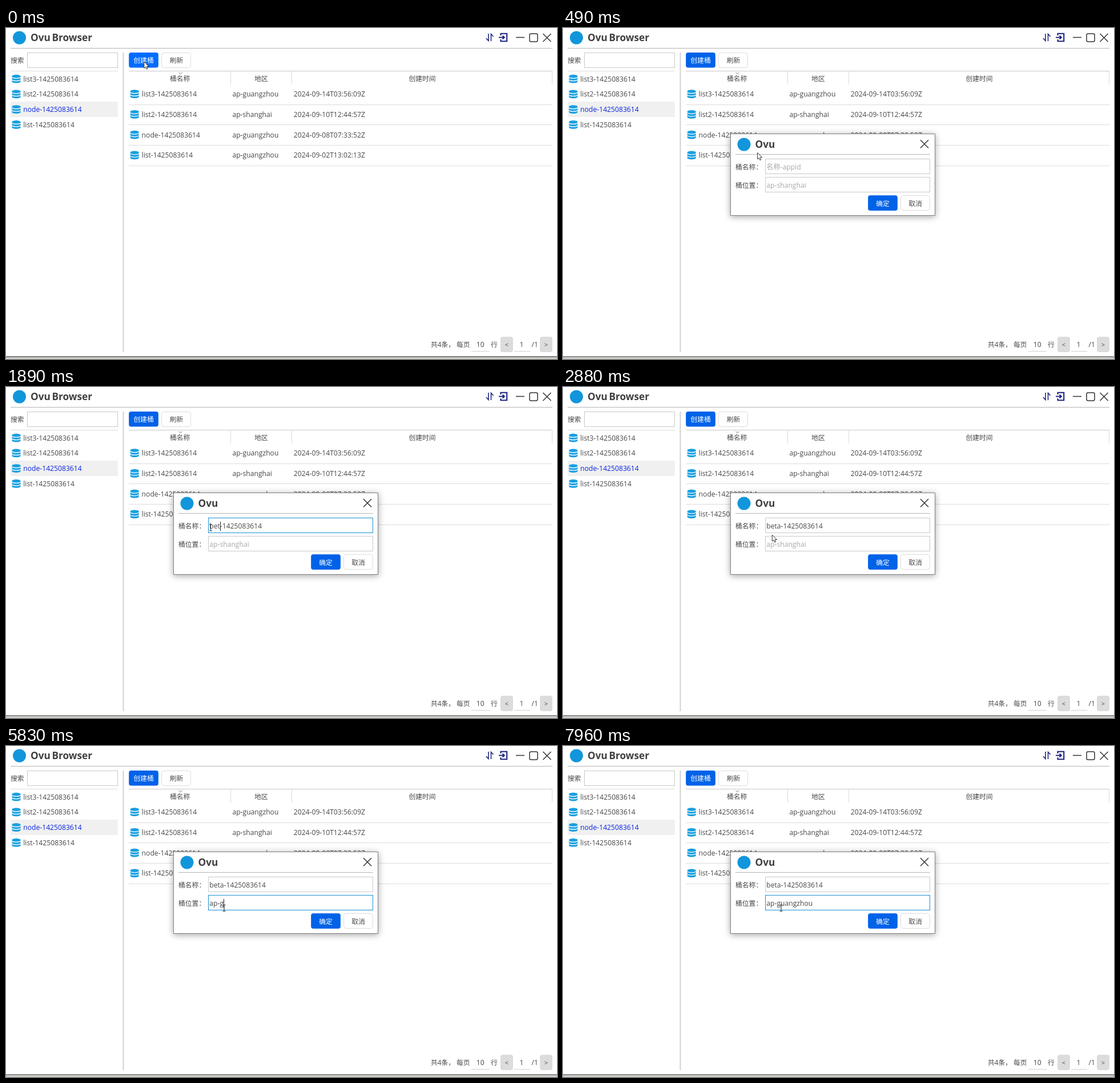
Write an HTML page that moves like this. It is 965 px wide and 580 px high and loops after 8000 ms.

```html
<!DOCTYPE html>
<html lang="zh-CN">
<head>
<meta charset="utf-8">
<title>Ovu Browser</title>
<style>
  html, body { margin: 0; width: 100%; height: 100%; overflow: hidden; background: #fff; }
  svg { display: block; width: 965px; height: 580px; }
  text { font: 12.15px "Open Sans", "Noto Sans CJK SC", "Noto Sans CJK", sans-serif; fill: #484848; white-space: pre; }
  .cjk { font-size: 11.8px; }
  .mid { text-anchor: middle; }
  .title { font-size: 17.2px; font-weight: 700; fill: #404040; word-spacing: -1.8px; }
  .hint { fill: #a9a9a9; }
  .light { fill: #fff; }
  .active { fill: #0a24e0; }
  .line { stroke: #dcdcdc; fill: none; }
  .rule { stroke: #b4b4b4; fill: none; }
  .box { fill: #fff; stroke: #c9c9c9; }
  .box.hover { stroke: #1c8fd6; }
  .btn { fill: #fff; stroke: #dcdcdc; }
  .primary { fill: #0062e8; }
  .pager { fill: #dcdcdc; }
  .ink { fill: none; stroke: #333; stroke-width: 1.5; }
  .navy { fill: none; stroke: #20267f; stroke-width: 1.6; }
  .panel { fill: #fff; stroke: #808080; filter: drop-shadow(0 2px 6px rgba(0, 0, 0, .36)); }
</style>
</head>
<body>
<svg viewBox="0 0 965 580">
  <defs>
    <g id="disk">
      <path fill="#189fe0" d="M0 2.8C0-.9 15-.9 15 2.8V12C15 15.7 0 15.7 0 12Z"/>
      <path fill="none" stroke="#fff" stroke-width="1.2" d="M0 4.3C1.5 7 13.5 7 15 4.3M0 8.8C1.5 11.5 13.5 11.5 15 8.8"/>
    </g>
    <path id="cross" class="ink" d="M-7-7L7 7M7-7L-7 7"/>
  </defs>

  <!-- window frame -->
  <rect y="577" width="965" height="3" fill="#d0cec9"/>
  <path id="edge" d="M0 576H965" stroke="#8c8c8c" stroke-width="2"/>
  <circle cx="23.5" cy="17" r="11.5" fill="#1296db"/>
  <text class="title" x="43" y="23.3">Ovu Browser</text>
  <path class="rule" d="M8 35.5H957"/>
  <path class="navy" d="M845 10V22.5L841 18M849.5 23V10.5L853.5 15"/>
  <path class="navy" stroke-width="2" d="M866.5 13V9.8H877.2V23.2H866.5V20M863 16.5H872.5M869.6 13.4L872.8 16.5 869.6 19.6" style="stroke-width:2.1"/>
  <path class="ink" d="M893 16.5H908"/>
  <rect class="ink" x="917" y="10" width="14" height="14" rx="2.5"/>
  <use href="#cross" x="947.5" y="17"/>

  <!-- sidebar -->
  <text class="cjk" x="8" y="61">搜索</text>
  <rect class="box" x="37.5" y="43.5" width="158" height="26"/>
  <path class="line" d="M8 75.5H196"/>
  <rect x="8" y="129" width="188" height="27" fill="#f0f0f0"/>
  <g id="side"></g>
  <path d="M205.5 43V568" stroke="#d2d2d2" stroke-width="2"/>

  <!-- toolbar and table -->
  <rect id="create" class="primary" x="215.2" y="42.9" width="51.7" height="26.7" rx="4"/>
  <text class="cjk mid light" x="241" y="61">创建桶</text>
  <rect class="btn" x="272.5" y="43.5" width="51" height="26" rx="4"/>
  <text class="cjk mid" x="298.5" y="61">刷新</text>
  <path stroke="#c8c8c8" d="M215 75.5H957"/>
  <path class="line" d="M393.5 76V99M500.5 76V99M956.5 76V99"/>
  <path fill="none" stroke="#777" d="M302.5 77.8L305.5 80.6 308.5 77.8"/>
  <text class="cjk mid" x="304.7" y="92.5">桶名称</text>
  <text class="cjk mid" x="447" y="92.5">地区</text>
  <text class="cjk mid" x="729" y="92.5">创建时间</text>
  <g id="table"></g>

  <!-- pager -->
  <text class="cjk" x="744" y="558.5">共4条，</text>
  <text class="cjk" x="789" y="558.5">每页</text>
  <text class="mid" x="830.7" y="558.5">10</text>
  <text class="cjk" x="849" y="558.5">行</text>
  <text class="mid" x="903" y="558.5">1</text>
  <text x="920.5" y="558.5">/1</text>
  <path stroke="#d0d0d0" d="M815 566.5H847M890 566.5H918"/>
  <rect class="pager" x="866" y="541" width="22" height="27" rx="4"/>
  <rect class="pager" x="935" y="541" width="22" height="27" rx="4"/>
  <text class="mid" x="877" y="558.5" style="font-size:11px">&lt;</text>
  <text class="mid" x="946" y="558.5" style="font-size:11px">&gt;</text>

  <!-- dialog -->
  <g id="dialog">
    <rect class="panel" x="293.5" y="185.5" width="358" height="143"/>
    <circle cx="317" cy="204" r="11.5" fill="#1296db"/>
    <text class="title" x="336.5" y="209.8">Ovu</text>
    <use href="#cross" x="633" y="203.2"/>
    <path class="rule" d="M302 221.5H643"/>
    <text class="cjk" x="302" y="247.5">桶名称：</text>
    <text class="cjk" x="302" y="279.5">桶位置：</text>
    <rect id="nameBox" class="box" x="354.5" y="229.5" width="288" height="26"/>
    <rect id="areaBox" class="box" x="354.5" y="261.5" width="288" height="26"/>
    <rect id="mark" x="356" y="236" height="16" fill="#a0a0a0"/>
    <text id="name" x="356.3" y="248"><tspan></tspan><tspan></tspan></text>
    <text id="area" x="356.3" y="280"></text>
    <rect id="caret" width="1" height="16" fill="#222"/>
    <rect class="primary" x="534.2" y="293.3" width="51.7" height="26.7" rx="4"/>
    <text class="cjk mid light" x="560" y="311.5">确定</text>
    <rect class="btn" x="591.5" y="293.5" width="51" height="26" rx="4"/>
    <text class="cjk mid" x="617" y="311.5">取消</text>
  </g>

  <path id="arrow" fill="#fff" stroke="#222" stroke-width=".9" d="M0 0V11.5L2.6 9.2 4.4 13.2 6.3 12.4 4.6 8.5H8.2Z"/>
  <path id="beam" fill="none" stroke="#333" stroke-width="1.1" d="M-2.5-5.5H-.6L0-5 .6-5.5H2.5M0-5V5M-2.5 5.5H-.6L0 5 .6 5.5H2.5"/>
</svg>

<script>
const LOOP = 8000;
const ID = '-1425083614';
const $ = id => document.getElementById(id);
const label = (x, y, s, cls = '') => `<text class="${cls}" x="${x}" y="${y}">${s}</text>`;
const disk = (x, y) => `<use href="#disk" x="${x}" y="${y}"/>`;

const buckets = [
  ['list3', 'guangzhou', '14T03:56:09Z'],
  ['list2', 'shanghai', '10T12:44:57Z'],
  ['node', 'guangzhou', '08T07:33:52Z'],
  ['list', 'guangzhou', '02T13:02:13Z']
];

$('side').innerHTML = buckets.map(([name], i) => {
  const y = 89 + 26.75 * i;
  return disk(10.5, y - 7.2) + label(30.3, y + 4.7, name + ID, i === 2 ? 'active' : '');
}).join('');

$('table').innerHTML = buckets.map(([name, area, date], i) => {
  const y = 115.7 + 35.7 * i, line = Math.round(y + 18) + .5;
  return disk(217.7, y - 7.4) + label(237.6, y + 4.6, name + ID) +
    label(396.4, y + 4.6, 'ap-' + area) + label(503.8, y + 4.6, '2024-09-' + date) +
    `<path class="line" d="M215 ${line}H957"/>`;
}).join('');

// Value of the last [time, value] step reached at t.
const at = (steps, t) => steps.reduce((v, s) => t >= s[0] ? s[1] : v, steps[0][1]);

const prefixSteps = [[0, ''], [760, 'list2'], [1220, 'b'], [1430, 'be'], [1890, 'bet'], [1960, 'beta']];
const areaText = 'ap-guangzhou';
const areaKeys = [3750, 4350, 4880, 5830, 6360, 6430, 6570, 6640, 6960, 7080, 7190, 7300];
const caretSteps = [[0, false], [620, true], [1160, false], [1220, true], [2620, false],
  [3160, true], [5410, false], [5830, true], [7960, false]];
const firstMove = [70, 160, 220, 290, 360, 420, 490, 550, 620];
const secondMove = [2880, 2950, 3020];

const show = (el, on) => el.style.display = on ? '' : 'none';
const passed = (times, t) => times.filter(k => t >= k).length;
const ease = u => u * u * (3 - 2 * u);

function pointer(t) {
  if (t < 70) return [241.8, 59];
  if (t < 2880) {
    const u = ease((passed(firstMove, t) - 1) / 8);
    return [243.5 + 115 * u, 66.5 + 180 * u];
  }
  const u = passed(secondMove, t) / 3;
  return [358.5 + 23.5 * u, 246.5 + 37.5 * u];
}

function drawPointer(t) {
  const [x, y] = pointer(t);
  const overName = y >= 229 && y < 257, overArea = y >= 261 && y < 289;
  const inField = t >= 70 && x >= 354 && (overName || overArea);
  show($('arrow'), !inField);
  show($('beam'), inField);
  $(inField ? 'beam' : 'arrow').setAttribute('transform', `translate(${x} ${y})`);
  $('nameBox').classList.toggle('hover', inField && overName);
  $('areaBox').classList.toggle('hover', inField && overArea);
}

function drawFields(t) {
  const prefix = at(prefixSteps, t), selected = t >= 1160 && t < 1220;
  const [head, tail] = $('name').children;
  head.textContent = prefix || '名称-appid';
  tail.textContent = prefix && ID;
  head.setAttribute('class', selected ? 'light' : prefix ? '' : 'hint');
  show($('mark'), selected);
  if (selected) $('mark').setAttribute('width', head.getComputedTextLength());

  const typed = areaText.slice(0, passed(areaKeys, t));
  $('area').textContent = typed || 'ap-shanghai';
  $('area').setAttribute('class', typed ? '' : 'hint');

  const inArea = t >= 3290, el = $(inArea ? 'area' : 'name');
  const count = inArea ? typed.length : prefix.length + (t >= 760 && t < 1160 ? ID.length : 0);
  const x = 356.5 + (count ? el.getSubStringLength(0, count) : 0);
  $('caret').setAttribute('x', Math.round(x));
  $('caret').setAttribute('y', inArea ? 268 : 236);
  show($('caret'), at(caretSteps, t));
}

function draw() {
  const t = performance.now() % LOOP, open = t >= 70;
  show($('dialog'), open);
  $('create').style.fill = open ? '' : '#006cff';
  $('edge').style.stroke = open ? '' : '#7c7c7c';
  if (open) drawFields(t);
  drawPointer(t);
  requestAnimationFrame(draw);
}
draw();
</script>
</body>
</html>
```
